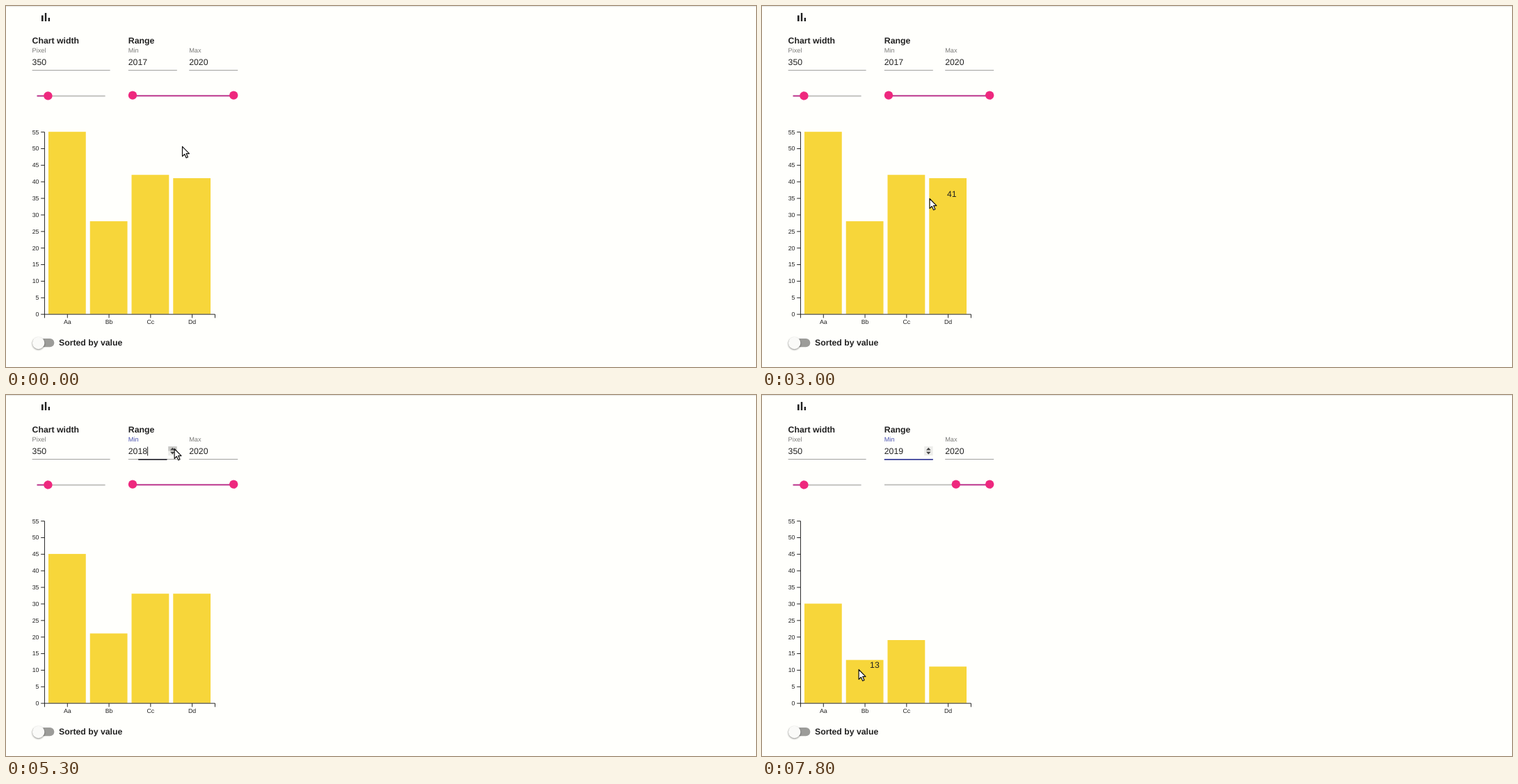
Animation of 1078x520 px, one loop 8000 ms. Source, as an HTML page:

```html
<!DOCTYPE html>
<html lang="en">
<head>
<meta charset="utf-8">
<title>Bar chart controls</title>
<style>
  html, body { margin: 0; width: 100%; height: 100%; overflow: hidden; background: #fffffc; }
  svg { display: block; width: 1078px; height: 520px; }
  text { font: 12.25px "Liberation Sans", Arial, sans-serif; fill: #212121; text-rendering: geometricPrecision; }
  .bold { font-weight: bold; }
  .hint { font-size: 9.19px; fill: #7a7a78; }
  .focused { fill: #4a52b0; }
  .tick { font-size: 8.75px; }
  .middle { text-anchor: middle; }
  .end { text-anchor: end; }
  .axis { stroke: #1c1c1c; stroke-width: .95; fill: none; }
  .line { stroke: #949492; stroke-width: .9; }
  .focus { stroke: #3b4099; stroke-width: 1.75; }
  .track { stroke: #bcbcb9; stroke-width: 1.75; }
  .fill { stroke: #c0288c; stroke-width: 1.75; }
  .thumb { fill: #ee287e; }
  .bar { fill: #f7d63a; }
  .shadow { filter: drop-shadow(0 1px 1px #0007); }
</style>
</head>
<body>
<svg id="stage" viewBox="0 0 1078 520">
  <rect width="1078" height="1.2" fill="#e6e6e3"/>
  <path transform="translate(46.7 5.7) scale(.86)" fill="#212121"
        d="M5 9.2h3V19H5zM10.6 5h2.8v14h-2.8zm5.6 8H19v6h-2.8z"/>
</svg>
<script>
const stage = document.getElementById("stage");
const LOOP = 8000, FRAME = 100, CLICKS = [5300, 5844], FIRST_YEAR = 2017;
const names = ["Aa", "Bb", "Cc", "Dd"];
const totals = [[55, 28, 42, 41], [45, 21, 33, 33], [30, 13, 19, 11]];

// The page is shown at 7/8 size, so lengths are page pixels times SCALE.
const SCALE = .875;
const LEFT = 55, BASE = 443.7, UNIT = 300 * SCALE / 55;
const WIDTH = 280 * SCALE, STEP = WIDTH / 4.1, BAND = STEP * .9;
const AXIS_X = LEFT + SCALE / 2, AXIS_Y = BASE + SCALE / 2, TICK = 6 * SCALE;
const MIN_X = 175.8, FIELD = 80 * SCALE, RANGE_START = 182, RANGE_END = 327.2;

const moves = [
  { from: 0, to: 0, x: 253, y: 202 },
  { from: 600, to: 1000, x: 107, y: 225 },
  { from: 1300, to: 1300, x: 73, y: 237 },
  { from: 1500, to: 1900, x: 156.7, y: 343 },
  { from: 2100, to: 2300, x: 206, y: 280 },
  { from: 2800, to: 3000, x: 240.5, y: 277 },
  { from: 3300, to: 4100, x: 217, y: 78 },
  { from: 4200, to: 4500, x: 241.5, y: 75 },
  { from: 5000, to: 5000, x: 241.6, y: 77 },
  { from: 6600, to: 7000, x: 100, y: 325 },
  { from: 7300, to: 7300, x: 80, y: 343 },
  { from: 7600, to: 7800, x: 138.6, y: 395 }
];

const clamp = v => Math.min(1, Math.max(0, v));
const mix = (a, b, k) => a + (b - a) * k;
const barX = i => LEFT + STEP * (i + .1);

function set(node, attrs) {
  for (const key in attrs) node.setAttribute(key, attrs[key]);
}

function add(tag, attrs, text = "") {
  const node = document.createElementNS("http://www.w3.org/2000/svg", tag);
  set(node, attrs);
  node.textContent = text;
  return stage.appendChild(node);
}

const show = (node, visible) => set(node, { visibility: visible ? "visible" : "hidden" });
const label = (text, x, y, type = "") => add("text", { x, y, class: type }, text);
const stroke = (type, d = "") => add("path", { class: type, d });
const thumb = (cx, cy) => add("circle", { class: "thumb", cx, cy, r: 6.2 });

function field(name, value, x, width) {
  stroke("line", `M${x} 92.6h${width}`);
  return { hint: label(name, x, 66.5, "hint"), value: label(value, x, 85) };
}

label("Chart width", 37.6, 54.2, "bold");
field("Pixel", 350, 37.6, 128 * SCALE);
stroke("track", "M44.6 129.5h98");
stroke("fill", "M44.6 129.5h16");
thumb(60.4, 129.4);

label("Range", MIN_X, 54.2, "bold");
const minField = field("Min", FIRST_YEAR, MIN_X, FIELD);
field("Max", 2020, 263.2, FIELD);
const focusLine = stroke("focus");
const caret = stroke("axis", "M203.6 74.5v13");
const spinner = [
  add("rect", { x: 233.2, y: 74, width: 12.4, height: 13.2, fill: "#ededea" }),
  add("rect", { x: 233.2, y: 74, width: 12.4, height: 6.6, fill: "#c9c9c6" }),
  add("path", { d: "M236 79.5h6.6l-3.3-3.7zm0 2.3h6.6l-3.3 3.7z", fill: "#454545" })
];
stroke("track", "M176 129.4h157");
const rangeFill = stroke("fill");
const minThumb = thumb(RANGE_START, 128.6);
thumb(RANGE_END, 128.6);

const bars = names.map((name, i) => {
  const middle = barX(i) + BAND / 2;
  stroke("axis", `M${middle + SCALE / 2} ${AXIS_Y}v${TICK}`);
  label(name, middle + SCALE / 2, AXIS_Y + 14, "tick middle");
  return add("rect", { class: "bar", x: barX(i), width: BAND });
});
for (let v = 0; v <= 55; v += 5) {
  const y = AXIS_Y - v * UNIT;
  stroke("axis", `M${AXIS_X} ${y}h${-TICK}`);
  label(v, 47.4, y + 2.9, "tick end");
}
stroke("axis", `M${AXIS_X} ${AXIS_Y - 55 * UNIT}V${AXIS_Y + TICK}m0 ${-TICK}h${WIDTH}v${TICK}`);

add("rect", { x: 37.8, y: 479, width: 36 * SCALE, height: 14 * SCALE, rx: 7 * SCALE, fill: "#9c9c99" });
add("circle", { class: "shadow", cx: 46.6, cy: 485.4, r: 10 * SCALE, fill: "#fafaf8" });
label("Sorted by value", 76, 489.4, "bold");

const tooltip = label("", 0, 0);
const cursor = add("path", {
  d: "M.5 .5V14.6L3.7 11.5L6.1 16.8L8.4 15.7L6.1 10.6H10.4Z",
  fill: "#fff", stroke: "#111", "stroke-width": 1.2, "stroke-linejoin": "round"
});

function pointer(t) {
  const i = moves.findLastIndex(move => move.from <= t);
  const move = moves[i], last = moves[i - 1] || move;
  const k = clamp((t - move.from + FRAME) / (move.to - move.from + FRAME));
  return { x: mix(last.x, move.x, k), y: mix(last.y, move.y, k) };
}

// cubic-bezier(.25, .8, .25, 1), solved by bisection
function ease(p) {
  const curve = (s, a, b) => 3 * (1 - s) ** 2 * s * a + 3 * (1 - s) * s * s * b + s ** 3;
  let low = 0, high = 1;
  for (let n = 0; n < 20; n++) {
    const mid = (low + high) / 2;
    if (curve(mid, .25, .25) < clamp(p)) low = mid; else high = mid;
  }
  return curve(low, .8, 1);
}

function draw(time) {
  const t = Math.floor(time / FRAME) * FRAME;
  const clicks = CLICKS.filter(click => t >= click).length;
  const values = totals[clicks];
  const { x, y } = pointer(t);

  bars.forEach((bar, i) => set(bar, { y: BASE - values[i] * UNIT, height: values[i] * UNIT }));

  minField.value.textContent = FIRST_YEAR + clicks;
  set(minField.hint, { class: clicks ? "hint focused" : "hint" });
  const spread = FIELD * clamp(.59 + (t - CLICKS[0]) / 250);
  show(focusLine, clicks);
  set(focusLine, {
    d: `M${MIN_X + (FIELD - spread) / 2} 92.9h${spread}`,
    style: spread < FIELD * .9 ? "stroke: #2b2b33" : ""
  });
  const blinkOn = t < 6800 || (t - 6800) % 1000 >= 500;
  show(caret, clicks && blinkOn);
  spinner.forEach(part => show(part, t >= 4200));
  show(spinner[1], t >= 4400 && t < 6600);

  const slide = CLICKS.reduce((sum, click) => sum + ease((t - click) / 400), 0);
  const thumbX = mix(RANGE_START, RANGE_END, slide / 3);
  set(minThumb, { cx: thumbX });
  set(rangeFill, { d: `M${thumbX} 129.4H${RANGE_END}` });

  const hovered = values.findIndex((v, i) =>
    x >= barX(i) && x <= barX(i) + BAND && y >= BASE - v * UNIT && y <= BASE);
  show(tooltip, t >= 1300 && hovered >= 0);
  tooltip.textContent = values[hovered] ?? "";
  set(tooltip, { x: x * 1.088 + 4.3, y: y - 2.2 });
  set(cursor, { transform: `translate(${x} ${y})` });
}

const start = performance.now();
function frame() {
  draw((performance.now() - start) % LOOP);
  requestAnimationFrame(frame);
}
frame();
</script>
</body>
</html>
```
